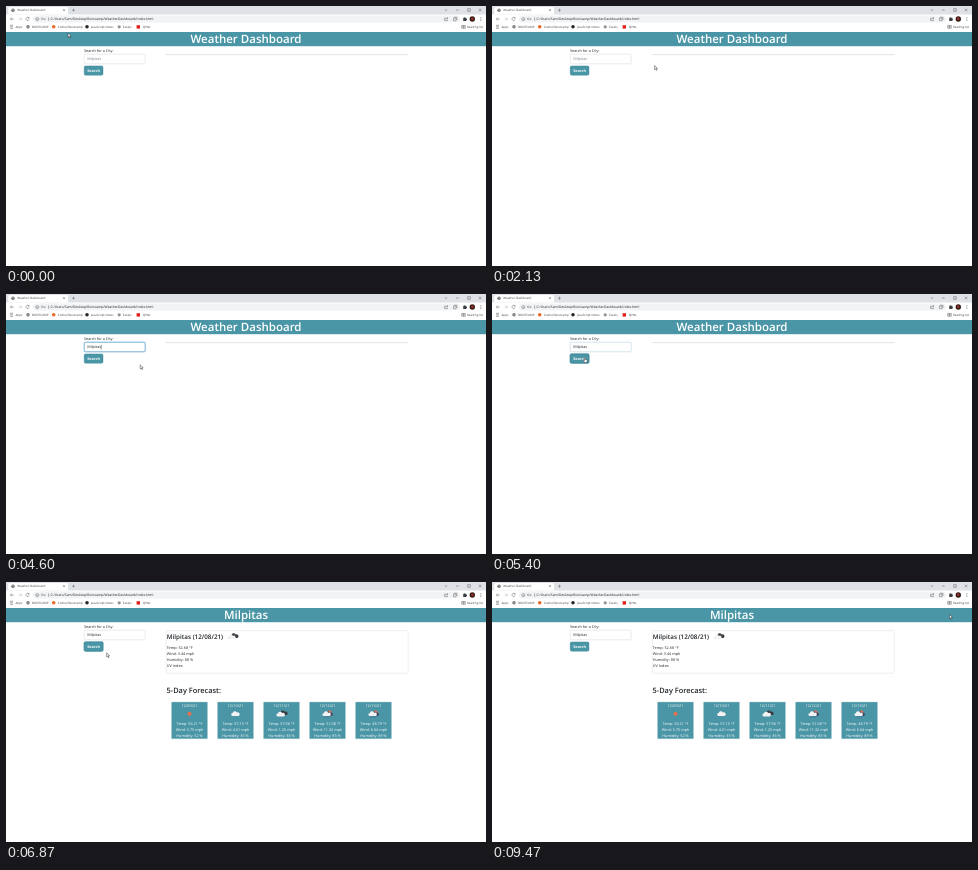
Recreate the animation shown at these times as an HTML page. Size 480x260 px, loop 9.59 s.

```html
<!DOCTYPE html>
<html lang="en">
<head>
<meta charset="utf-8">
<title>Weather Dashboard</title>
<style>
html, body { margin: 0; width: 100%; height: 100%; overflow: hidden; background: #fff; }
svg { display: block; width: 480px; height: 260px; }
text { font-family: "Open Sans", "Noto Sans", sans-serif; font-size: 3.75px; fill: #212529; text-rendering: geometricPrecision; white-space: pre; }
.ui text { font-size: 3px; fill: #3c4043; }
.line { fill: none; stroke: #5f6368; stroke-width: .5; }
.bold { font-weight: 700; }
.mid { text-anchor: middle; }
#title { font-size: 11.5px; font-weight: 600; fill: #fff; }
#cards text { fill: #fff; }
.teal { fill: #4a96a6; }
.pointer { fill: #fff; stroke: #111; stroke-width: .4; stroke-linejoin: round; }
</style>
</head>
<body>
<svg viewBox="0 0 480 260">
  <defs>
    <path id="cloud" d="M-3 2.1a1.4 1.4 0 0 1 .2-2.8A2.2 2.2 0 0 1 1.4-1.2A1.7 1.7 0 0 1 3.2 2.1Z"/>
    <g id="globe">
      <circle r="1.7" fill="#5f6368"/>
      <path d="M-1.2-.5 0-.9.3 0-.5.8M.7.9 1.2-.2" fill="none" stroke="#fff" stroke-width=".4"/>
    </g>
    <g id="sunny"><circle r="2" fill="#ec6e4c"/></g>
    <g id="cloudy"><use href="#cloud" fill="#f2f2f2"/></g>
    <g id="broken">
      <use href="#cloud" x="2" y="-.8" fill="#393c40"/>
      <use href="#cloud" x="-.8" y=".5" fill="#f2f2f2"/>
    </g>
    <g id="rainy">
      <circle cx="2" cy="-1.5" r="1.9" fill="#ec6e4c"/>
      <use href="#cloud" x="1.2" y=".2" fill="#3d4663"/>
      <use href="#cloud" x="-.8" y=".1" fill="#f2f2f2"/>
      <path d="M-2 2.5l-.5 1.2M0 2.5l-.5 1.2M2 2.5l-.5 1.2" stroke="#34488a" stroke-width=".6"/>
    </g>
  </defs>

  <g class="ui">
    <path fill="#dee1e6" d="M0 0H480V8.5H0Z"/>
    <path fill="#fff" d="M1 8.5Q2.3 8.5 2.3 7V2.5Q2.3 1 4 1H60.5Q62 1 62 2.5V7Q62 8.5 63.5 8.5Z"/>
    <use href="#globe" x="7" y="4.3"/>
    <text x="11.3" y="5.2">Weather Dashboard</text>
    <path class="line" d="M57 3.1l2 2m0-2l-2 2M66 4.2h3m-1.5-1.5v3"/>
    <path class="line" d="M438.6 3.5l1.3 1.2 1.3-1.2M450 4h2.8M461.7 2.7h2.6v2.6h-2.6ZM472.8 2.7l2.6 2.6m0-2.6l-2.6 2.6"/>
    <rect x="27" y="9.6" width="427" height="7" rx="3.5" fill="#f1f3f4"/>
    <path class="line" d="M7.7 13H4.4m1.5-1.5L4.4 13l1.5 1.5"/>
    <path class="line" stroke-opacity=".45" d="M12.4 13h3.3m-1.5-1.5l1.5 1.5-1.5 1.5"/>
    <path class="line" d="M22.9 12a1.6 1.6 0 1 0 .2 1.4M23.1 11v1.2h-1.2"/>
    <circle class="line" cx="31.3" cy="13.1" r="1.5"/>
    <path class="line" d="M31.3 12.8v1.2M42.6 11.4v3.4"/>
    <text x="35" y="14.3">File</text>
    <text x="44.4" y="14.3" style="font-size:3.38px;fill:#202124">C:/Users/Sam/Desktop/Bootcamp/WeatherDashboard/index.html</text>
    <path class="line" d="M440 12h-1.3v2.6h2.8v-1M439.9 13.4q.2-1.4 2-1.4m-.8-.8l.8.8-.8.8M447.5 12h2.6v2.7h-2.6ZM448.5 12v-.8h2.4v2.8"/>
    <path fill="#3c4043" d="M457.2 11.8h1a.6.6 0 0 1 1.2 0h1v1a.6.6 0 0 1 0 1.2v1h-3.2Z"/>
    <circle cx="466.3" cy="13" r="2.7" fill="#351d1a"/>
    <circle cx="466.3" cy="12.7" r="1.2" fill="#a33328"/>
    <path d="M474.8 11.3v3.6" stroke="#5f6368" stroke-width=".8" stroke-dasharray=".8 .6"/>

    <path d="M4 19.3h3M4 20.8h3M4 22.3h3" stroke="#5f6368" stroke-width=".8" stroke-dasharray=".7 .45"/>
    <text x="9.4" y="22">Apps</text>
    <use href="#globe" x="22" y="20.8"/>
    <text x="26" y="22">BOOTCAMP</text>
    <circle cx="47.7" cy="20.8" r="1.8" fill="#e8692a"/>
    <text x="51.8" y="22">Codnel Bootcamp</text>
    <circle cx="81" cy="20.8" r="1.8" fill="#24292e"/>
    <text x="85" y="22">JavaScript Notes</text>
    <circle cx="113.2" cy="20.8" r="1.6" fill="#8b9299"/>
    <text x="117" y="22">Easels</text>
    <rect x="130.6" y="19.2" width="3.4" height="3.4" fill="#e3211c"/>
    <text x="136.8" y="22">QVNL</text>
    <path class="line" d="M455.7 19.4h3.6v2.9h-3.6Zm0 1.4h3.6M457.5 19.4v2.9"/>
    <text x="461" y="22">Reading list</text>
  </g>

  <rect class="teal" y="26" width="480" height="14.2"/>
  <text id="title" class="mid" x="240" y="37.4"></text>

  <text x="78" y="46.4">Search for a City:</text>
  <rect id="field" x="78.2" y="48.2" width="61" height="9.6" rx="1" fill="#fff"/>
  <text id="city" x="81.3" y="54.4"></text>
  <path id="caret" d="M0 50.7v4.8" stroke="#111" stroke-width=".4"/>
  <rect id="ring" x="77.6" y="59.3" width="20" height="10.5" rx="2" fill="#8fc0cb"/>
  <rect id="button" class="teal" x="78.2" y="59.9" width="18.8" height="9.3" rx="1.4" stroke="#3b8494" stroke-width=".4"/>
  <text class="bold mid" x="87.6" y="65.9" style="fill:#fff">Search</text>
  <path id="rule" d="M160 48.6H402.5" stroke="#c8c9cb" stroke-width=".5"/>

  <g id="today">
    <rect x="160.2" y="48.6" width="242" height="42.6" rx=".8" fill="none" stroke="#dcdee1" stroke-width=".5"/>
    <text class="bold" x="160.8" y="56.5" style="font-size:6.3px;font-weight:600">Milpitas (12/08/21)</text>
    <use href="#broken" x="226.3" y="54.6"/>
    <text x="160.8" y="67.4">Temp: 52.68 °F</text>
    <text x="160.8" y="73.4">Wind: 3.44 mph</text>
    <text x="160.8" y="79.4">Humidity: 88 %</text>
    <text x="160.8" y="85.4">UV Index:</text>
  </g>
  <g id="forecast">
    <text x="160.6" y="111" style="font-size:7.4px;font-weight:600">5-Day Forecast:</text>
    <g id="cards"></g>
  </g>

  <g id="mouse">
    <path id="arrow" class="pointer" d="M0 0V4.2L1 3.3 1.7 4.9 2.4 4.6 1.7 3.1H3Z"/>
    <path id="beam" fill="none" stroke="#222" stroke-width=".45" d="M-.9-2.4Q0-2.4 0-1.9 0-2.4.9-2.4M0-1.9V1.9M-.9 2.4Q0 2.4 0 1.9 0 2.4.9 2.4"/>
    <path id="hand" class="pointer" d="M-.5-1.8Q0-2.3.4-1.8V0L2 .4Q2.4.6 2.3 1.2L1.8 3H-.4L-1.8.9Q-1.6.3-1 .7L-.5 1Z"/>
  </g>
</svg>
<script>
const LOOP = 9590;
const $ = id => document.getElementById(id);

const days = [
  ["09", "sunny", "56.21", "5.75", 52],
  ["10", "cloudy", "57.15", "4.61", 35],
  ["11", "broken", "57.96", "1.25", 36],
  ["12", "rainy", "51.08", "11.32", 85],
  ["13", "rainy", "48.79", "6.64", 89]
];
$("cards").innerHTML = days.map(([day, icon, temp, wind, wet], i) => {
  const row = (y, s) => `<text class="mid" x="18" y="${y}">${s}</text>`;
  return `<g transform="translate(${165.5 + 46 * i} 120)">
    <rect class="teal" width="36" height="36.8" rx=".6" stroke="#a9c9d1" stroke-width=".4"/>
    ${row(4.8, `12/${day}/21`)}<use href="#${icon}" x="18" y="11.8"/>
    ${row(22.9, `Temp: ${temp} °F`)}${row(28.9, `Wind: ${wind} mph`)}${row(34.9, `Humidity: ${wet} %`)}</g>`;
}).join("");

// Time, x, y
const path = [
  [0, 62, 27], [180, 68, 20.5], [400, 104, 30], [650, 150, 49], [870, 166.7, 56.3],
  [1670, 166.7, 56.3], [1900, 188, 61], [2200, 155, 59], [2600, 118.5, 57.5],
  [4400, 118.5, 57.5], [4650, 138, 74], [4900, 106, 70], [5130, 93, 65.5],
  [6800, 93, 65.5], [7050, 120, 84], [7400, 180, 132], [7600, 206, 141], [7800, 214, 139.5],
  [8000, 214, 139.5], [8270, 219, 139.5], [8400, 337, 117],
  [8540, 337, 117], [8850, 382, 88], [9200, 436, 45], [9470, 457.5, 32.4], [LOOP, 457.5, 32.4]
];
const typed = [[3200, 1], [3330, 2], [3470, 3], [3670, 4], [3800, 5], [3870, 6], [4070, 7], [4330, 8]];

function mouseAt(t) {
  const i = path.findIndex(p => p[0] > t);
  const [t0, x0, y0] = path[i - 1], [t1, x1, y1] = path[i];
  const k = (t - t0) / (t1 - t0);
  return [x0 + (x1 - x0) * k, y0 + (y1 - y0) * k];
}

const show = (id, on) => $(id).style.display = on ? "" : "none";
const within = (t, a, b) => t >= a && t < b;

function draw(t) {
  const [x, y] = mouseAt(t);
  const overField = x > 78 && x < 139.5 && y > 48 && y < 58;
  const overButton = x > 78 && x < 97 && y > 60 && y < 69.5;
  const overText = within(t, 7860, 8300);
  $("mouse").setAttribute("transform", `translate(${x} ${y})`);
  show("hand", overButton);
  show("beam", !overButton && (overField || overText));
  show("arrow", !overButton && !overField && !overText);

  const count = typed.filter(k => k[0] <= t).length;
  const focused = within(t, 2470, 5270);
  const city = $("city");
  city.textContent = "Milpitas".slice(0, count || 8);
  city.style.fill = count ? "#212529" : "#7b838a";
  const blink = count ? t < 4830 || t >= 5230 : t < 2930;
  show("caret", focused && blink);
  const caretX = 81.5 + (count ? city.getComputedTextLength() : 0);
  $("caret").setAttribute("transform", `translate(${caretX} 0)`);
  const fading = within(t, 5270, 5470);
  $("field").setAttribute("stroke", focused ? "#4f9bcb" : fading ? "#a9c8d6" : "#ced4da");
  $("field").setAttribute("stroke-width", focused ? .8 : .5);

  const pressed = within(t, 5270, 7730);
  show("ring", pressed);
  $("button").setAttribute("stroke", pressed ? "#2f7080" : "#3b8494");

  const loaded = t >= 5470;
  $("title").textContent = loaded ? "Milpitas" : "Weather Dashboard";
  show("rule", !loaded);
  show("today", loaded);
  show("forecast", t >= 5600);
}

function tick(now) {
  draw(now % LOOP);
  requestAnimationFrame(tick);
}
draw(0);
requestAnimationFrame(tick);
</script>
</body>
</html>
```
